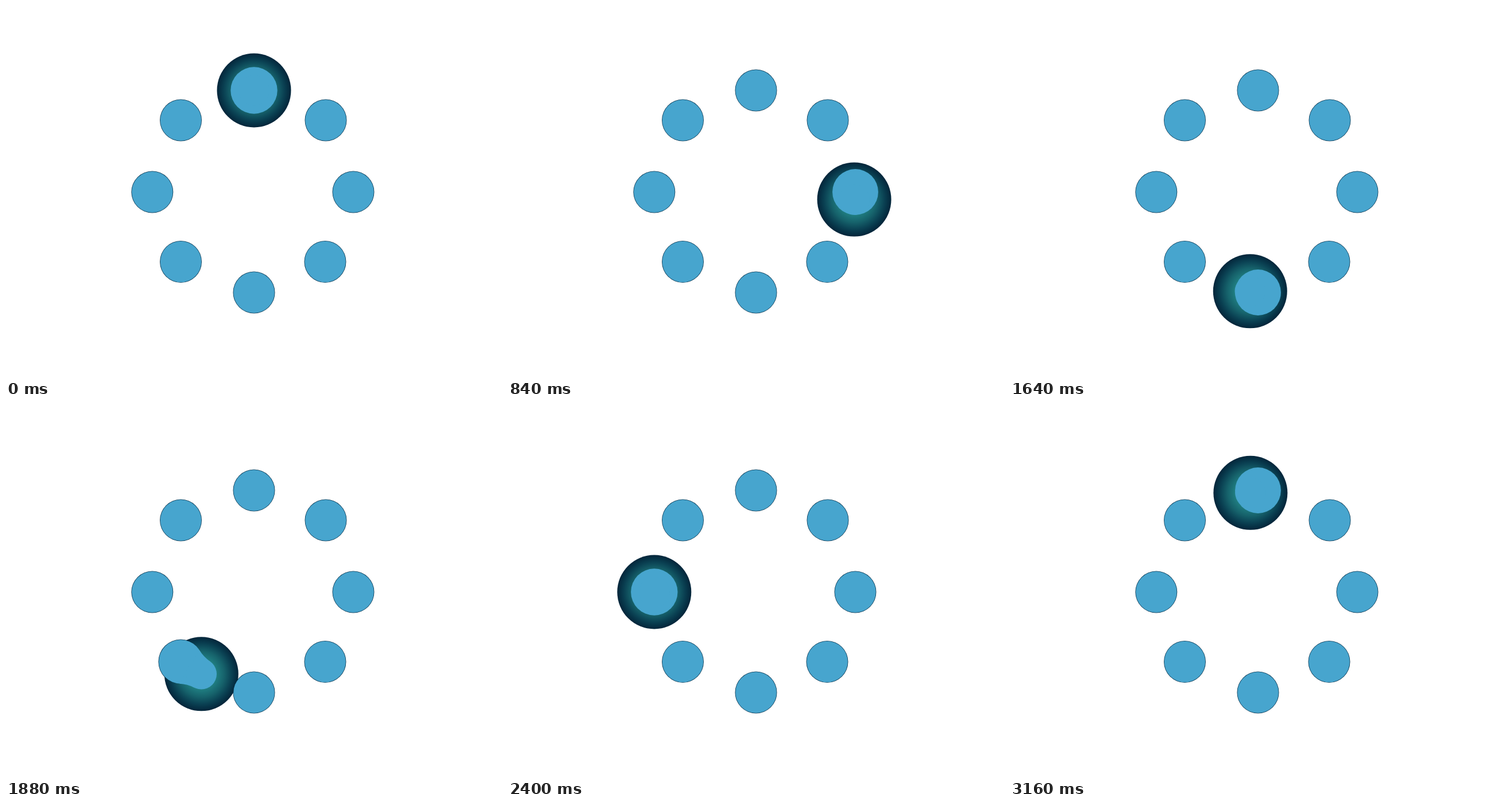
Write an HTML page that moves like this. It is 864x648 px and loops after 3200 ms.

```html
<!DOCTYPE html>
<html lang="en">
<head>
<meta charset="utf-8">
<title>Gooey loader</title>
<style>
  html, body { margin: 0; width: 100%; height: 100%; overflow: hidden; background: #fff; }
  svg { display: block; width: 100vw; height: 100vh; }
</style>
</head>
<body>
<svg id="stage" viewBox="0 0 864 648">
  <defs>
    <radialGradient id="glow">
      <stop offset="0.38" stop-color="#218284"/>
      <stop offset="0.62" stop-color="#16626b"/>
      <stop offset="0.82" stop-color="#0a4052"/>
      <stop offset="1" stop-color="#03253a"/>
    </radialGradient>
  </defs>
  <g id="outlines" fill="#0d3a55"></g>
  <circle id="halo" r="64.5" fill="url(#glow)"/>
  <g id="goo" fill="#47a5ce"></g>
</svg>
<script>
const LOOP = 3200, FRAME = 40;
const DOT_R = 35.7, BALL_R = 26.7, GROWTH = 5, GROWTH_SPAN = 0.62;
const BEND = 0.092;

const dots = [
  [432, 147], [557, 199], [605, 324], [556, 445.5],
  [432, 499], [304.5, 445.5], [254.8, 324], [304.5, 199]
];
const COUNT = dots.length;
const dotAt = i => dots[(i + COUNT) % COUNT];

function make(tag, parent) {
  const el = document.createElementNS("http://www.w3.org/2000/svg", tag);
  if (parent) parent.appendChild(el);
  return el;
}

function set(el, attrs) {
  for (const key in attrs) el.setAttribute(key, attrs[key]);
}

// Handles follow the neighbours; the path has a corner at the first dot.
function handle(i, sign) {
  const [x, y] = dotAt(i);
  const bend = i % COUNT === 0 ? 0 : BEND * sign;
  const [ax, ay] = dotAt(i - 1), [bx, by] = dotAt(i + 1);
  return [x + (bx - ax) * bend, y + (by - ay) * bend];
}

const segments = dots.map((dot, i) => {
  const path = make("path");
  set(path, { d: `M${dot} C${handle(i, 1)} ${handle(i + 1, -1)} ${dotAt(i + 1)}` });
  return { path, length: path.getTotalLength() };
});

const halo = document.getElementById("halo");
const goo = document.getElementById("goo");
const outlines = document.getElementById("outlines");
const parts = dots.map(([cx, cy]) => {
  const part = {
    cx, cy,
    outline: make("circle", outlines),
    disc: make("circle", goo),
    neck: make("path", goo)
  };
  set(part.outline, { cx, cy });
  set(part.disc, { cx, cy });
  return part;
});
const ball = make("circle", goo);
set(ball, { r: BALL_R });

// Bridge between two circles on the x axis, with sides rounded by tangent circles.
function neckPath(radius, distance) {
  const fillet = 140 - 1.8 * distance;
  if (fillet <= 0 || distance <= radius - BALL_R) return "";
  const a = radius + fillet, b = BALL_R + fillet;
  const x = (a * a + distance * distance - b * b) / (2 * distance);
  const h = Math.sqrt(Math.max(0, a * a - x * x));
  if (h <= fillet) return "";
  const x1 = x * radius / a, y1 = h * radius / a;
  const x2 = distance + (x - distance) * BALL_R / b, y2 = h * BALL_R / b;
  const arc = `A${fillet} ${fillet} 0 0 1`;
  return `M${x1} ${y1} ${arc} ${x2} ${y2} L${x2} ${-y2} ${arc} ${x1} ${-y1}Z`;
}

function render(time) {
  const phase = (Math.floor(time / FRAME) * FRAME % LOOP) / LOOP * COUNT;
  const index = Math.floor(phase);
  const { path, length } = segments[index];
  const { x, y } = path.getPointAtLength((phase - index) * length);

  set(halo, { cx: x, cy: y });
  set(ball, { cx: x, cy: y });

  parts.forEach((part, i) => {
    const away = Math.abs(phase - i);
    const steps = Math.min(away, COUNT - away);
    const r = DOT_R + GROWTH * Math.max(0, 1 - steps / GROWTH_SPAN);
    const dx = x - part.cx, dy = y - part.cy;
    const angle = Math.atan2(dy, dx) * 180 / Math.PI;
    set(part.disc, { r });
    set(part.outline, { r: r + 0.8 });
    set(part.neck, {
      d: neckPath(r, Math.hypot(dx, dy)),
      transform: `translate(${part.cx} ${part.cy}) rotate(${angle})`
    });
  });
}

const start = performance.now();
function tick() {
  render(performance.now() - start);
  requestAnimationFrame(tick);
}
tick();
</script>
</body>
</html>
```
